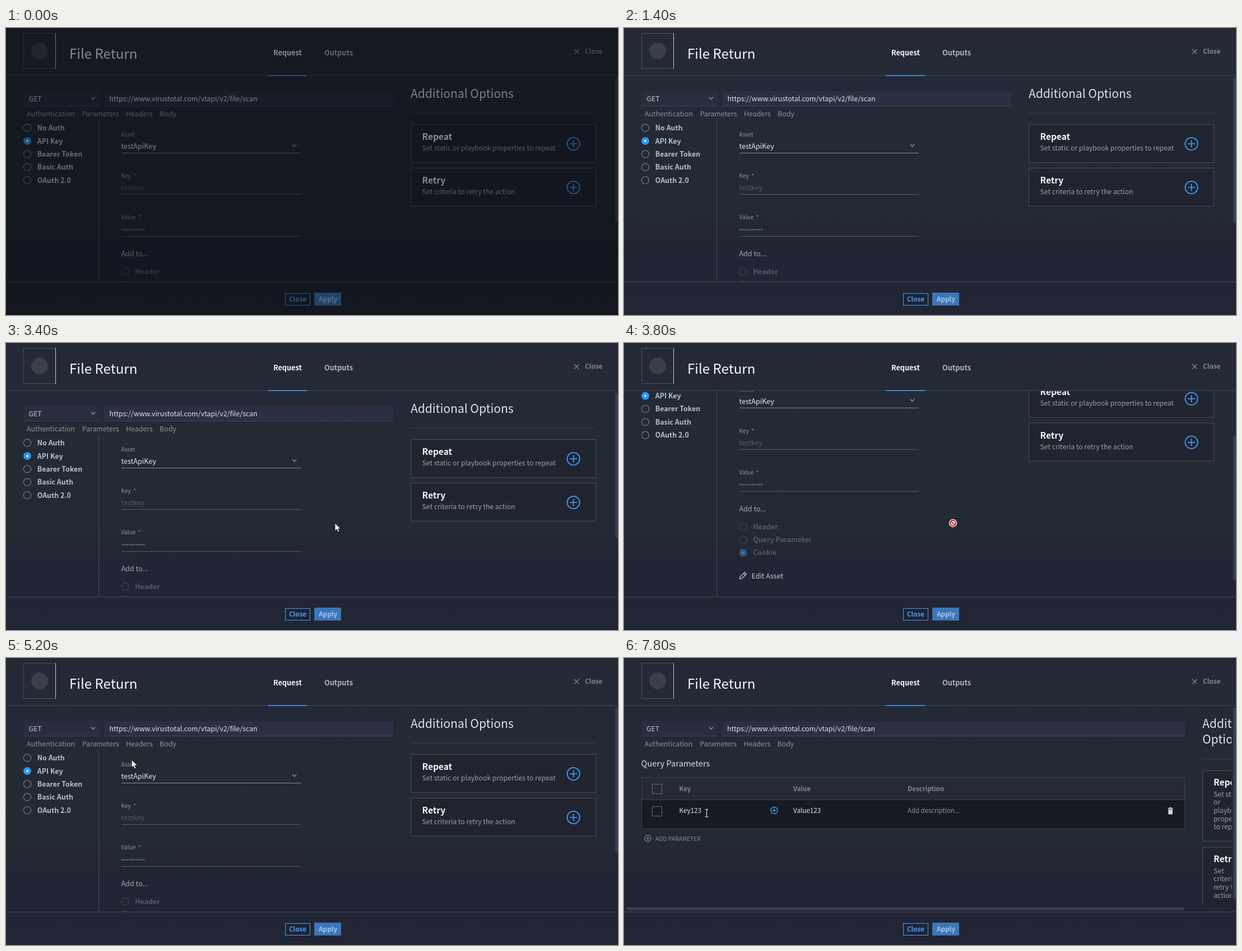
These frames come from a looping animation (1092x513 px, 8000 ms). An HTML page with a canvas:

```html
<!DOCTYPE html>
<html lang="en">
<head>
<meta charset="utf-8">
<title>File Return</title>
<style>
html, body { margin: 0; width: 100%; height: 100%; overflow: hidden; background: #222633; }
canvas { display: block; }
</style>
</head>
<body>
<canvas id="stage" width="1092" height="513"></canvas>
<script>
const c = document.getElementById('stage').getContext('2d');
const FONT = '"Noto Sans CJK SC", "Noto Sans CJK JP", "Noto Sans", sans-serif';
const BLUE = '#449dfa', WHITE = '#f6f7f9', MUTED = '#8d939f', EDGE = '#484d59';

function text(s, x, y, size, color, weight = 400) {
  c.font = `${weight} ${size}px ${FONT}`;
  c.fillStyle = color;
  c.fillText(s, x, y);
}
const bold = (s, x, y, size, color) => text(s, x, y, size, color, 700);
function rect(x, y, w, h, color) {
  c.fillStyle = color;
  c.fillRect(x, y, w, h);
}
function box(x, y, w, h, color, fill) {
  if (fill) rect(x, y, w, h, fill);
  c.strokeStyle = color;
  c.lineWidth = 1;
  c.strokeRect(x + .5, y + .5, w - 1, h - 1);
}
function path(d, color, width = 1.5, fill) {
  const p = new Path2D(d);
  if (fill) { c.fillStyle = fill; c.fill(p); }
  c.strokeStyle = color;
  c.lineWidth = width;
  c.stroke(p);
}
function circle(x, y, r, stroke, width, fill) {
  c.beginPath();
  c.arc(x, y, r, 0, 7);
  if (fill) { c.fillStyle = fill; c.fill(); }
  if (stroke) { c.strokeStyle = stroke; c.lineWidth = width; c.stroke(); }
}
function clipped(x, y, w, h, draw) {
  c.save();
  c.beginPath();
  c.rect(x, y, w, h);
  c.clip();
  draw();
  c.restore();
}
function bar(x, y, w, h) {
  c.fillStyle = '#3b404e';
  c.beginPath();
  c.roundRect(x, y, w, h, 2.5);
  c.fill();
}

function plus(x, y, r, arm, color, width) {
  circle(x, y, r, color, width);
  path(`M${x - arm} ${y}h${2 * arm}M${x} ${y - arm}v${2 * arm}`, color, width);
}
function radio(label, x, y, on, dim) {
  if (on) {
    circle(x, y, 7, 0, 0, dim ? '#265a89' : '#2896f5');
    circle(x, y, 2, 0, 0, dim ? '#5f7d99' : '#fff');
  } else circle(x, y, 6.6, dim ? '#3e4450' : '#7b818d', 1.1);
  bold(label, x + 17.7, y + 4.6, 12.45, dim ? '#535966' : '#b9bec8');
}
function chevron(x, y) {
  path(`M${x - 3.6} ${y - 2}l3.6 3.8l3.6 -3.8`, '#858b99', 1.6);
}

function background() {
  const g = c.createLinearGradient(0, 0, 0, 513);
  [[0, '#252936'], [.16, '#242936'], [.3, '#232a34'], [.66, '#232933'], [.76, '#212533'], [1, '#222533']]
    .forEach(s => g.addColorStop(...s));
  rect(0, 0, 1092, 513, g);
}
function frame() {
  rect(0, 84, 1092, 1.5, '#383d49');
  rect(467, 84, 70, 2, '#3d83cf');
  box(31, 9, 58, 64, '#4b505b');
  rect(88, 9, 1, 64, '#c3c7cd');
  circle(60, 41, 15, 0, 0, '#3a3f4b');
  text('File Return', 113, 55, 24.1, WHITE);
  bold('Request', 477, 49, 12.7, WHITE);
  bold('Outputs', 568, 49, 12.7, '#b0b5c0');
  path('M1014 38l8.4 8.4M1022.4 38l-8.4 8.4', '#858b97', 1.3);
  bold('Close', 1033, 46, 11.8, '#7f8591');

  rect(0, 453, 1092, 1.5, '#3a3e4a');
  box(498, 474, 45, 22, BLUE, '#1f2432');
  bold('Close', 505, 489, 11.6, BLUE);
  rect(550, 473, 48, 23, '#3c76ba');
  bold('Apply', 558, 489, 11.8, '#a9c6e8');
}

function requestLine(x, right) {
  rect(31, 113, 136 + x, 27, '#2a2d3d');
  rect(175 + x, 113, right - 175 - x, 27, '#2c2f41');
  rect(31, 139, 136 + x, 1, '#3a4160');
  rect(175 + x, 139, right - 175 - x, 1, '#3a4464');
  text('GET', 40.5 + x, 131, 12.4, '#c6cad2');
  chevron(155.5, 125.5);
  text('https://www.virustotal.com/vtapi/v2/file/scan', 184.5 + x, 131, 12.4, '#dfe2e8');
  [['Authentication', 37], ['Parameters', 135.7], ['Headers', 214], ['Body', 274]]
    .forEach(([s, tx]) => text(s, tx + x, 158, 12.4, MUTED));
}

function authPage(scroll) {
  clipped(0, 86, 1086, 367, () => {
    c.translate(0, -scroll);
    requestLine(0, 691);
    ['No Auth', 'API Key', 'Bearer Token', 'Basic Auth', 'OAuth 2.0']
      .forEach((s, i) => radio(s, 38, 178.5 + i * 23.4, i == 1));
    rect(165, 164, 1, 440, EDGE);

    text('Asset', 205.5, 194, 10.1, '#8f95a2');
    text('testApiKey', 205.5, 216, 12.55, '#e6e8ec');
    chevron(514.5, 210);
    rect(206, 223, 320, 1, '#858b99');
    text('Key  *', 205.5, 268, 10.1, '#8f95a2');
    text('testkey', 205.5, 290, 12.4, '#535966');
    rect(206, 297, 320, 1, '#555b68');
    text('Value  *', 205.5, 342, 10.1, '#8f95a2');
    for (let i = 0; i < 10; i++) circle(207.5 + i * 4.27, 360.5, 1.6, 0, 0, '#5f6572');
    rect(206, 372, 320, 1, '#555b68');
    text('Add to...', 205.5, 408, 12.5, '#a3a8b3');
    ['Header', 'Query Parameter', 'Cookie']
      .forEach((s, i) => radio(s, 212.5, 435.5 + i * 23.4, i == 2, true));
    path('M206.5 529l.8 -3.7l8 -8l3 3l-8 8zM213.3 519.3l3 3', '#c3c7cf', 1.3);
    text('Edit Asset', 227.5, 528, 12.4, '#c9cdd5');

    text('Additional Options', 722, 125, 21, '#dfe2e7');
    rect(722, 151.5, 330, 1, '#3a3f4b');
    [['Repeat', 'Set static or playbook properties to repeat'], ['Retry', 'Set criteria to retry the action']]
      .forEach(([title, info], i) => {
        const y = 172 + i * 78.5 | 0;
        box(722, y, 331, 69, EDGE, '#20242f');
        bold(title, 742.5, y + 28, 15.5, WHITE);
        text(info, 742.5, y + 47, 12.2, '#9ba0ab');
        plus(1012.5, y + 35, 11.2, 6.5, BLUE, 1.7);
      });
  });
  bar(1087, 89 + scroll * .712, 5, 259);
}

function paramsPage(hover) {
  requestLine(-.5, 1001);
  text('Query Parameters', 30.5, 194, 14.7, '#d7dae0', 500);
  box(31, 213, 970, 93, '#3a404c', '#252a36');
  rect(32, 254, 968, 51, hover ? '#171a22' : '#1c1f2b');
  rect(32, 253, 968, 1, '#3a404c');
  [225, 265].forEach(y => box(50, y, 18, 18, '#666c79'));
  [['Key', 98.5], ['Value', 302], ['Description', 506]]
    .forEach(([s, x]) => bold(s, x, 238, 11.5, '#7f8592'));
  text('Key123', 98.5, 276.5, 11.65, '#e0e3e8');
  text('Value123', 302, 276.5, 11.65, '#e0e3e8');
  text('Add description...', 506, 277, 11.4, MUTED);
  if (hover) plus(268, 272.5, 6, 3.3, BLUE, 1.4);
  rect(970.5, 268, 9, 1.6, '#d0d3d9');
  rect(973, 267, 4, 1.5, '#d0d3d9');
  rect(971.2, 270.5, 7.6, 9, '#d0d3d9');
  plus(42.5, 322.5, 5.6, 3, '#828895', 1.2);
  text('ADD PARAMETER', 56, 326.5, 10.3, '#828895');

  clipped(1031, 86, 53, 355, () => {
    text('Additional', 1032, 125, 21, '#dfe2e7');
    text('Options', 1032, 153, 21, '#dfe2e7');
    rect(1032, 180, 60, 1, '#3a3f4b');
    [['Repeat', 201, 127, ['Set static', 'or', 'playbook', 'properties', 'to repeat']],
     ['Retry', 338, 127, ['Set', 'criteria to', 'retry the', 'action']]]
      .forEach(([title, y, h, lines]) => {
        box(1032, y, 90, h, EDGE, '#20242f');
        bold(title, 1052, y + 27, 15.5, WHITE);
        lines.forEach((s, i) => text(s, 1052, y + 46.5 + i * 14.7, 12.2, '#9ba0ab'));
      });
  });
  bar(4, 445.5, 996, 5);
  bar(1087, 89, 5, 342);
}

const cursors = {
  arrow: () => path('M0 0v14l3.2 -3l2.3 5l2.4 -1l-2.2 -5h4.4z', '#111', .9, '#fff'),
  hand: () => path('M-1.5 1.2q1.5 -2.2 3 0v5.6q1.5 -1.4 2.7 .4q1.5 -1 2.6 .5q2 -.8 2.4 1.2v4.6l-1.8 3.4v3h-7.8v-2.6l-4.2 -5.6q-.8 -2.4 1.4 -2l1.7 1.8z', '#111', .9, '#fff'),
  no: () => {
    circle(0, 0, 5.4, '#fff', 3.6, '#fff');
    circle(0, 0, 5, '#d0121f', 2);
    path('M-3.4 -3.4l6.8 6.8', '#d0121f', 2);
  },
  beam: () => path('M-3 -6.5h2.2l.8 .8l.8 -.8h2.2M0 -6v12.5M-3 7h2.2l.8 -.8l.8 .8h2.2', '#e8eaee', 1.2)
};

// Piecewise eased value: keys are [time, value...]
function tween(keys, t) {
  let i = 0;
  while (i < keys.length - 2 && t >= keys[i + 1][0]) i++;
  const [a, b] = [keys[i], keys[i + 1]];
  const u = Math.min(1, Math.max(0, (t - a[0]) / (b[0] - a[0])));
  const e = u * u * (3 - 2 * u);
  return a.slice(1).map((v, k) => v + (b[k + 1] - v) * e);
}
const POINTER = [[1800, 38, 204], [2200, 38, 204], [2400, 77, 218], [3400, 587, 322],
  [4600, 587, 322], [5400, 157, 156], [6400, 157, 156], [7600, 148, 275], [7800, 147.5, 277]];
const SCROLL = [[3400, 0], [4000, 145], [4200, 145], [4600, 0]];

function pointerShape(t, x, y, scroll) {
  if (scroll > 40) return 'no';
  if (t < 5600) return x < 140 && y < 280 || y < 162 ? 'hand' : 'arrow';
  return y > 254 ? 'beam' : y < 165 ? 'hand' : 'arrow';
}

function draw() {
  const t = Math.floor(performance.now() % 8000 / 200) * 200;
  const [x, y] = tween(POINTER, t), [scroll] = tween(SCROLL, t);
  background();
  if (t < 6000) authPage(scroll);
  else paramsPage(y > 254);
  frame();
  if (t >= 1800) {
    c.save();
    c.translate(x, y);
    cursors[pointerShape(t, x, y, scroll)]();
    c.restore();
  }
  if (t < 200) rect(0, 0, 1092, 513, 'rgba(4,5,10,.45)');
  requestAnimationFrame(draw);
}
draw();
</script>
</body>
</html>
```
